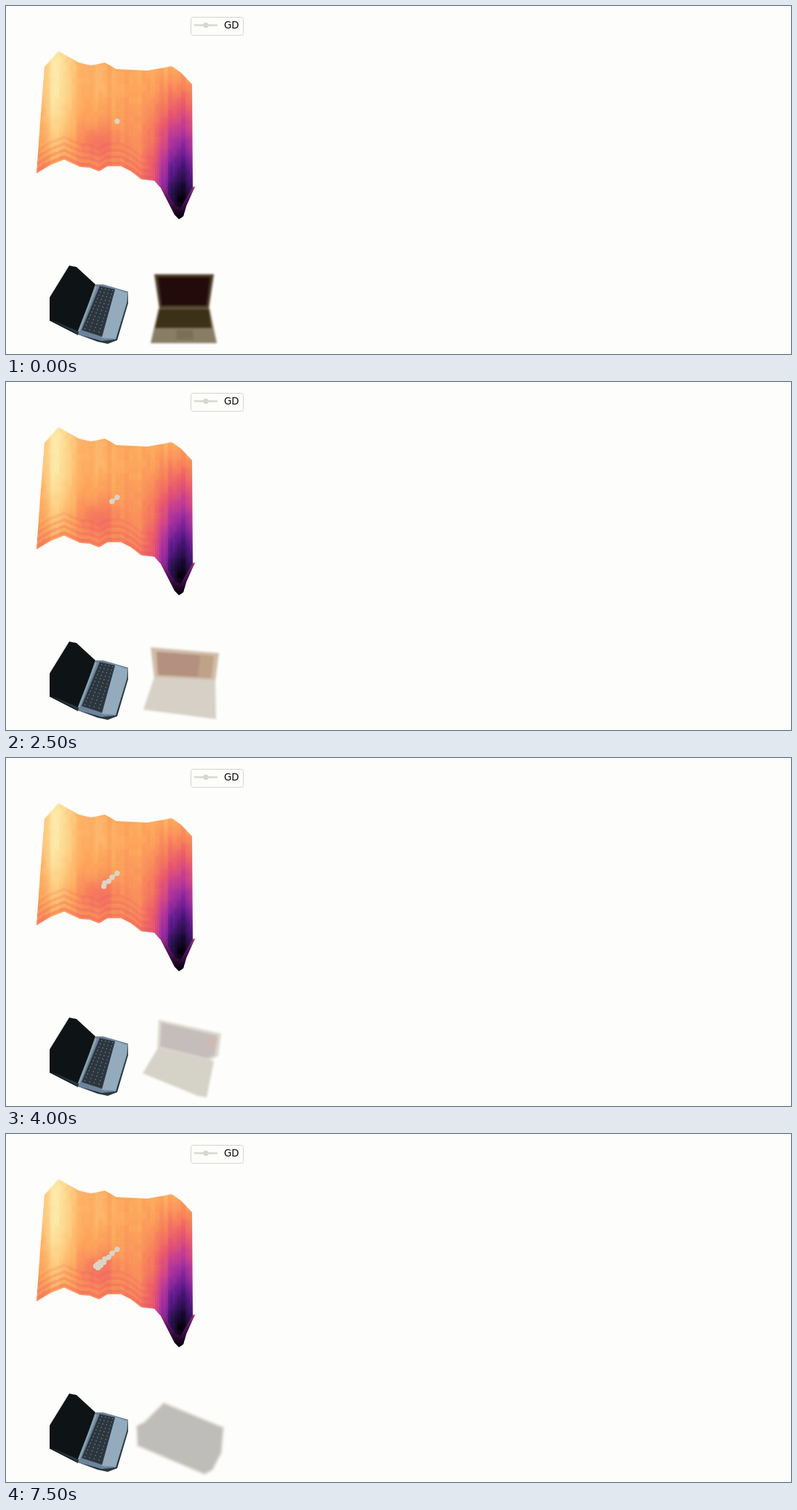
An HTML page with a canvas for the animation above (8000 ms loop, 1080 by 480 pixels).

```html
<!DOCTYPE html>
<html lang="en">
<head>
<meta charset="utf-8">
<title>GD</title>
<style>
html, body { margin: 0; width: 100%; height: 100%; overflow: hidden; background: #fdfdfc; }
canvas, svg { position: absolute; left: 0; top: 0; display: block; }
text { font: 13.3px "DejaVu Sans", sans-serif; fill: #0a0a08; }
.soft { filter: blur(1.5px); }
.crisp { filter: blur(.6px); }
</style>
</head>
<body>
<canvas id="surface" width="1080" height="480"></canvas>
<svg width="1080" height="480" viewBox="0 0 1080 480">
  <rect x="254.5" y="15.5" width="72" height="25" rx="3" fill="#fdfdfc" stroke="#d6d6cc"/>
  <path d="M259 26.5H291" stroke="#d9d8d0" stroke-width="2.5"/>
  <circle cx="275" cy="26.5" r="3.7" fill="#d9d8d0"/>
  <text x="300" y="31">GD</text>

  <g id="trail" fill="#dbd5c6">
    <polyline fill="none" stroke="#dbd5c6" stroke-width="3" stroke-linejoin="round"/>
  </g>

  <g class="crisp">
    <path d="M60 402L87 358 97 360 123 384 99 454 60 434Z" fill="#0e1316"/>
    <path d="M60 432L99 453 126 463 140 466 153 461 168 410V395L150 455 98 448Z" fill="#29373f"/>
    <path d="M123 384H134L168 394 167 408 151 460 132 462 99 453Z" fill="#6c8499"/>
    <path d="M150 390L167 396 166 408 151 459 132 458Z" fill="#93abbd"/>
    <path d="M129 386L150 391 132 456 104 447Z" fill="#2c363e"/>
    <path d="M132 389L108 446M137 390L114 449M142 391L120 452M147 392L127 453" stroke="#75858f" stroke-width="1.2" stroke-dasharray="1.5 3.5"/>
    <path d="M124 387L100 449" stroke="#8ca4b2" stroke-width="2.5"/>
  </g>

  <g class="look soft">
    <path d="M204 370H286L279 417H211Z" fill="#4e3f28"/>
    <path d="M209 374H281L276 413H214Z" fill="#220b0a"/>
    <path d="M210 417H280L290 465H199Z" fill="#8a7d65"/>
    <path d="M211 418H279L283 444H205Z" fill="#3b3118"/>
    <path d="M235 447H257L258 460H234Z" fill="#7b6f58"/>
  </g>
  <g class="look soft">
    <path d="M199 366L293 374 288 412 204 408Z" fill="#d0bca7"/>
    <path d="M207 372L286 378 282 408 209 404Z" fill="#b3907f"/>
    <path d="M267 377L286 378 282 408 264 407Z" fill="#bfa287"/>
    <path d="M204 407L288 411 289 465 189 452Z" fill="#d6d0c6"/>
  </g>
  <g class="look soft">
    <path d="M210 361L296 380 292 411 278 418 208 402Z" fill="#dcd8cc"/>
    <path d="M214 365L291 383 287 410 276 414 212 398Z" fill="#c4bdbc"/>
    <path d="M277 382L291 386 289 398 276 402Z" fill="#cfb9b3"/>
    <path d="M209 400L286 418 276 468 264 466 188 435Z" fill="#d5d2c8"/>
  </g>
  <g class="look soft">
    <path d="M180 403L191 397 217 371 299 405 296 440 284 463 273 469 181 430Z" fill="#bfbdba" stroke="#dedcd0" stroke-width="2.5"/>
  </g>
</svg>
<script>
const STEP = 500, LOOP = 8000;
const NS = "http://www.w3.org/2000/svg";

// Edges of the surface, going clockwise
const back = "42 231 47 160 53 84 72 62 100 78 117 82 136 78 152 87 195 89 228 83 241 92 256 108 257 250";
const valley = "260 249 248 276 244 290 238 294 232 288 213 251";
const front = "204 241 186 239 172 228 158 221 140 221 128 228 115 223 102 222 80 212 60 220 42 231";
const rim = "217 250 233 276 240 278 257 250";

const ramp = ["#050008", "#28104c", "#601a8c", "#982c9e", "#c84090", "#ea5a6c", "#f77f5c", "#fda65c", "#fdca7e", "#fce9a8"]
  .map(c => [1, 3, 5].map(i => parseInt(c.slice(i, i + 2), 16)));

const clamp = (v, lo, hi) => Math.min(hi, Math.max(lo, v));
const bell = (d, width) => Math.exp(-d * d / width / width);
const noise = n => { const s = Math.sin(n * 127.1) * 43758.5; return s - Math.floor(s) - .5; };

// Loss value from 0 (black) to 9 (pale yellow)
function height(x, y) {
  const near = clamp((y - 110) / 110, 0, 1);
  const slope = 7.1 - .7 * near;
  const ridge = 1.8 * bell(x - 70, 22) * (1 - .7 * near * near);
  const bump = .4 * bell(x - 130, 10) * bell(y - 100, 35);
  const dip = .9 * bell(x - 126, 28) * bell(y - 188, 24);
  const pit = 6.3 * clamp((y - 85) / 180, 0, 1) * bell(x - 241, 36);
  const facets = .35 * noise(Math.floor(x / 6)) + .2 * noise(Math.floor(x / 6) + 50 * Math.floor(y / 9));
  return clamp(slope + ridge + bump - dip - pit + facets, 0, 8.99);
}

function shade(h) {
  const i = Math.floor(h), a = ramp[i], b = ramp[i + 1] || a;
  return `rgb(${a.map((c, n) => Math.round(c + (b[n] - c) * (h - i)))})`;
}

function drawSurface() {
  const ctx = document.getElementById("surface").getContext("2d");
  ctx.clip(new Path2D(`M${back} ${valley} ${front}Z`));
  for (let x = 40; x < 262; x += 3)
    for (let y = 60; y < 296; y += 3) {
      ctx.fillStyle = shade(height(x + 1, y + 1));
      ctx.fillRect(x, y, 3, 3);
    }
  // Folds along the front edge
  const edge = new Path2D(`M${front}`);
  ctx.lineWidth = 4;
  for (let k = 0; k < 4; k++) {
    ctx.strokeStyle = `rgba(226,70,96,${.26 - .05 * k})`;
    ctx.translate(0, k ? -9 : -4);
    ctx.stroke(edge);
  }
  ctx.resetTransform();

  const wall = ctx.createLinearGradient(0, 246, 0, 292);
  wall.addColorStop(0, "#b83a6c");
  wall.addColorStop(.4, "#5a1464");
  wall.addColorStop(1, "#08000a");
  ctx.fillStyle = wall;
  ctx.fill(new Path2D(`M${valley} ${rim}Z`));
}
drawSurface();

// Each step covers a share of the remaining way, with a small zigzag
function visit(n) {
  const done = 1 - .77 ** n;
  const zigzag = 1.3 * Math.min(n / 5, 1) * (n % 2 ? 1 : -1);
  return [153 - 30 * done - zigzag, 159 + 26 * done - zigzag];
}

const visits = Array.from({ length: 12 }, (_, n) => visit(n));
const trail = document.getElementById("trail"), line = trail.firstElementChild;
const looks = [...document.querySelectorAll(".look")];
const dots = visits.map(([x, y]) => {
  const dot = document.createElementNS(NS, "circle");
  dot.setAttribute("cx", x);
  dot.setAttribute("cy", y);
  dot.setAttribute("r", 3.7);
  return trail.appendChild(dot);
});

function draw(now) {
  const step = Math.floor(now % LOOP / STEP);
  const last = Math.max(0, step - 4);
  const look = clamp(Math.floor((step - 3) / 2), 0, 3);
  line.setAttribute("points", visits.slice(0, last + 1).join(" "));
  dots.forEach((d, i) => d.style.display = i <= last ? "" : "none");
  looks.forEach((g, i) => g.style.display = i === look ? "" : "none");
}

const start = performance.now();
function tick() {
  draw(performance.now() - start);
  requestAnimationFrame(tick);
}
tick();
</script>
</body>
</html>
```
